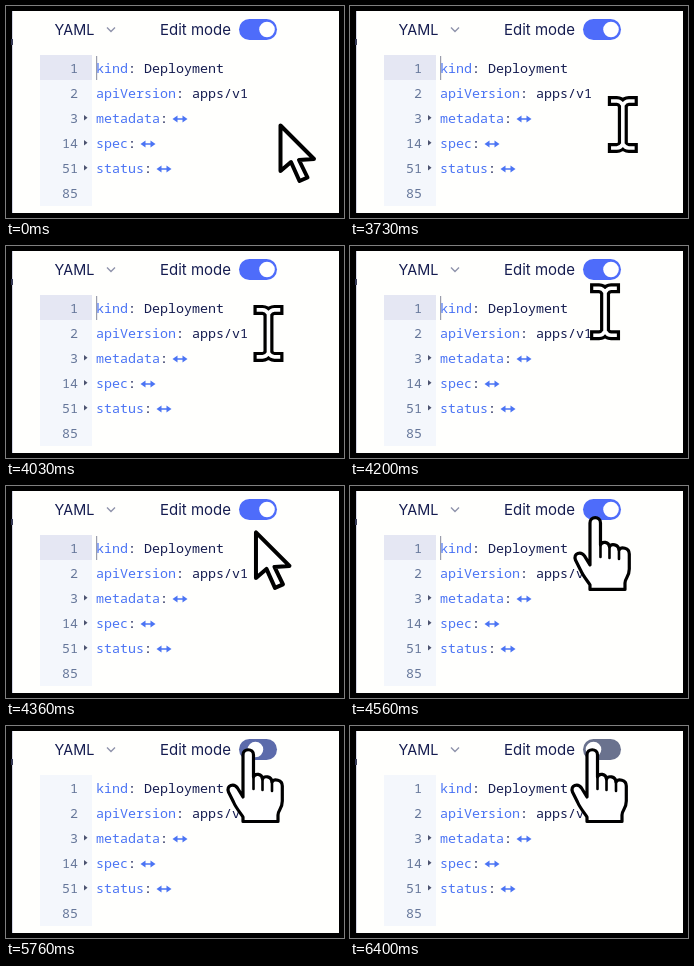
Animation, 338 px wide and 212 px high, one loop 7660 ms. Source, as an HTML page with a canvas:

```html
<!DOCTYPE html>
<html lang="en">
<head>
<meta charset="utf-8">
<title>Edit mode toggle</title>
<style>
html, body { margin: 0; width: 100%; height: 100%; overflow: hidden; background: #000; }
canvas { display: block; width: 338px; height: 212px; }
</style>
</head>
<body>
<canvas id="stage"></canvas>
<script>
const W = 338, H = 212, LOOP = 7660;
const MONO = '13.33px "Noto Sans Mono", "DejaVu Sans Mono", monospace';
const SANS = 'Inter, Roboto, sans-serif';
const BLUE = '#4b74f4', NAVY = '#151c50', GRAY = '#66779a';
const canvas = document.getElementById('stage');
const ctx = canvas.getContext('2d');
const dpr = window.devicePixelRatio || 1;
canvas.width = W * dpr;
canvas.height = H * dpr;

const rows = [
  ['1', 'kind', 'Deployment'],
  ['2', 'apiVersion', 'apps/v1'],
  ['3', 'metadata', ''],
  ['14', 'spec', ''],
  ['51', 'status', ''],
  ['85']
];

// time, x, y of the pointer's hot spot
const track = [
  [3700, 273, 119],
  [4030, 262.5, 87.5],
  [4360, 248.5, 46],
  [4560, 245, 31],
  [4730, 242, 23]
];

const arrow = new Path2D('M1.5 1.5V47L12 38L20.5 57L28.5 53.5L20 36L35 35Z');
const hand = new Path2D(
  'M-5 48V6C-5 -1 5.5 -1 5.5 6V28C7 24 14 24.5 14.5 30' +
  'C16 26.5 23.5 27 24 33C26 29.5 34.3 30.5 34.3 37V52' +
  'C34.3 60 30 61 30 66V72.5H-5V68C-7.5 64 -12 59 -14.5 53L-19.5 43' +
  'C-22 36 -14 34 -10.5 39Z');
const folds = new Path2D('M5.5 26V40M14.5 29V41M24 32V42');
const beam = new Path2D(
  'M-10 -23.5H-6C-3 -23.5 -1.5 -22 0 -19.5C1.5 -22 3 -23.5 6 -23.5H10' +
  'M-10 23.5H-6C-3 23.5 -1.5 22 0 19.5C1.5 22 3 23.5 6 23.5H10M0 -19.5V19.5');

const clamp = v => Math.max(0, Math.min(1, v));
const smooth = v => { v = clamp(v); return v * v * (3 - 2 * v); };
const mix = (a, b, k) => a + (b - a) * k;
const blend = (a, b, k) => `rgb(${a.map((v, i) => Math.round(mix(v, b[i], k)))})`;

function rect(x, y, w, h, color) {
  ctx.fillStyle = color;
  ctx.fillRect(x, y, w, h);
}

function text(s, x, y, color, font, align = 'left') {
  ctx.font = font;
  ctx.fillStyle = color;
  ctx.textAlign = align;
  ctx.fillText(s, x, y);
}

function line(points, color, width) {
  ctx.beginPath();
  points.forEach(p => ctx.lineTo(...p));
  ctx.strokeStyle = color;
  ctx.lineWidth = width;
  ctx.stroke();
}

function triangle(points, color) {
  ctx.beginPath();
  points.forEach(p => ctx.lineTo(...p));
  ctx.fillStyle = color;
  ctx.fill();
}

function slope(i, axis) {
  if (i === 0 || i === track.length - 1) return 0;
  const a = track[i - 1], b = track[i + 1];
  return (b[axis] - a[axis]) / (b[0] - a[0]);
}

function position(t) {
  const last = track.length - 1;
  if (t <= track[0][0]) return track[0].slice(1);
  if (t >= track[last][0]) return track[last].slice(1);
  const i = track.findIndex(p => p[0] > t) - 1;
  const a = track[i], b = track[i + 1], d = b[0] - a[0];
  const u = (t - a[0]) / d, u2 = u * u, u3 = u2 * u;
  return [1, 2].map(k =>
    (2 * u3 - 3 * u2 + 1) * a[k] + (u3 - 2 * u2 + u) * d * slope(i, k) +
    (3 * u2 - 2 * u3) * b[k] + (u3 - u2) * d * slope(i + 1, k));
}

function foldMark(x, y) {
  line([[x + 3, y], [x + 12, y]], BLUE, 1.5);
  triangle([[x, y], [x + 5, y - 3.5], [x + 5, y + 3.5]], BLUE);
  triangle([[x + 15, y], [x + 10, y - 3.5], [x + 10, y + 3.5]], BLUE);
}

function editor(t) {
  const focused = t < 5560;
  rect(34, 49, 52, 151, '#f4f7fc');
  if (focused) {
    rect(34, 49, 52, 25, '#e5e7f3');
    rect(90, 50, 1.2, 24, '#9a9dac');
  }
  rows.forEach(([num, key, value], i) => {
    const y = Math.round(66.6 + i * 25.15);
    text(num, 72, y, GRAY, MONO, 'right');
    if (!key) return;
    const end = 90 + key.length * 8;
    text(key, 90, y, BLUE, MONO);
    text(':', end, y, NAVY, MONO);
    if (value) {
      text(value, end + 16, y, NAVY, MONO);
    } else {
      foldMark(end + 12.5, y - 4);
      triangle([[78, y - 8], [81.5, y - 5.2], [78, y - 2.4]], '#4b526f');
    }
  });
}

function toggle(t) {
  const off = smooth((t - 5560) / 330);
  const on = t < 5200 ? [78, 108, 250] : [64, 92, 228];
  ctx.beginPath();
  ctx.roundRect(233, 13, 38, 21, 10.5);
  ctx.fillStyle = blend(on, [106, 114, 142], off);
  ctx.fill();
  ctx.beginPath();
  ctx.arc(mix(261, 243.5, off), 23.5, 7.8, 0, Math.PI * 2);
  ctx.fillStyle = '#fff';
  ctx.fill();
}

function shape(path, width) {
  ctx.lineWidth = width;
  ctx.strokeStyle = '#000';
  ctx.fillStyle = '#fff';
  ctx.fill(path);
  ctx.stroke(path);
}

function pointer(t) {
  const [x, y] = position(t);
  ctx.save();
  ctx.lineJoin = 'round';
  if (t >= 4500) {
    ctx.translate(x, y);
    ctx.lineCap = 'round';
    shape(hand, 3.2);
    ctx.lineWidth = 2.6;
    ctx.stroke(folds);
  } else if (t < 3730 || t >= 4335) {
    ctx.translate(x, y - 1);
    shape(arrow, 4);
  } else {
    ctx.translate(x, y);
    ctx.lineCap = 'square';
    for (const [color, width] of [['#000', 10], ['#fff', 3.6]]) {
      ctx.strokeStyle = color;
      ctx.lineWidth = width;
      ctx.stroke(beam);
    }
  }
  ctx.restore();
}

function draw(t) {
  ctx.setTransform(dpr, 0, 0, dpr, 0, 0);
  rect(0, 0, W, H, '#000');
  rect(6, 5, 327, 202, '#fffffd');
  rect(6, 5, 1, 202, '#d3d5e4');
  rect(5, 33, 2, 6, '#353955');
  text('YAML', 48.5, 29, NAVY, '14.4px ' + SANS);
  line([[101, 21.5], [105, 25.5], [109, 21.5]], '#8f93ab', 1.4);
  text('Edit mode', 154, 29, NAVY, '15px ' + SANS);
  toggle(t);
  editor(t);
  pointer(t);
}

const start = performance.now();
function tick() {
  draw((performance.now() - start) % LOOP);
  requestAnimationFrame(tick);
}
tick();
</script>
</body>
</html>
```
